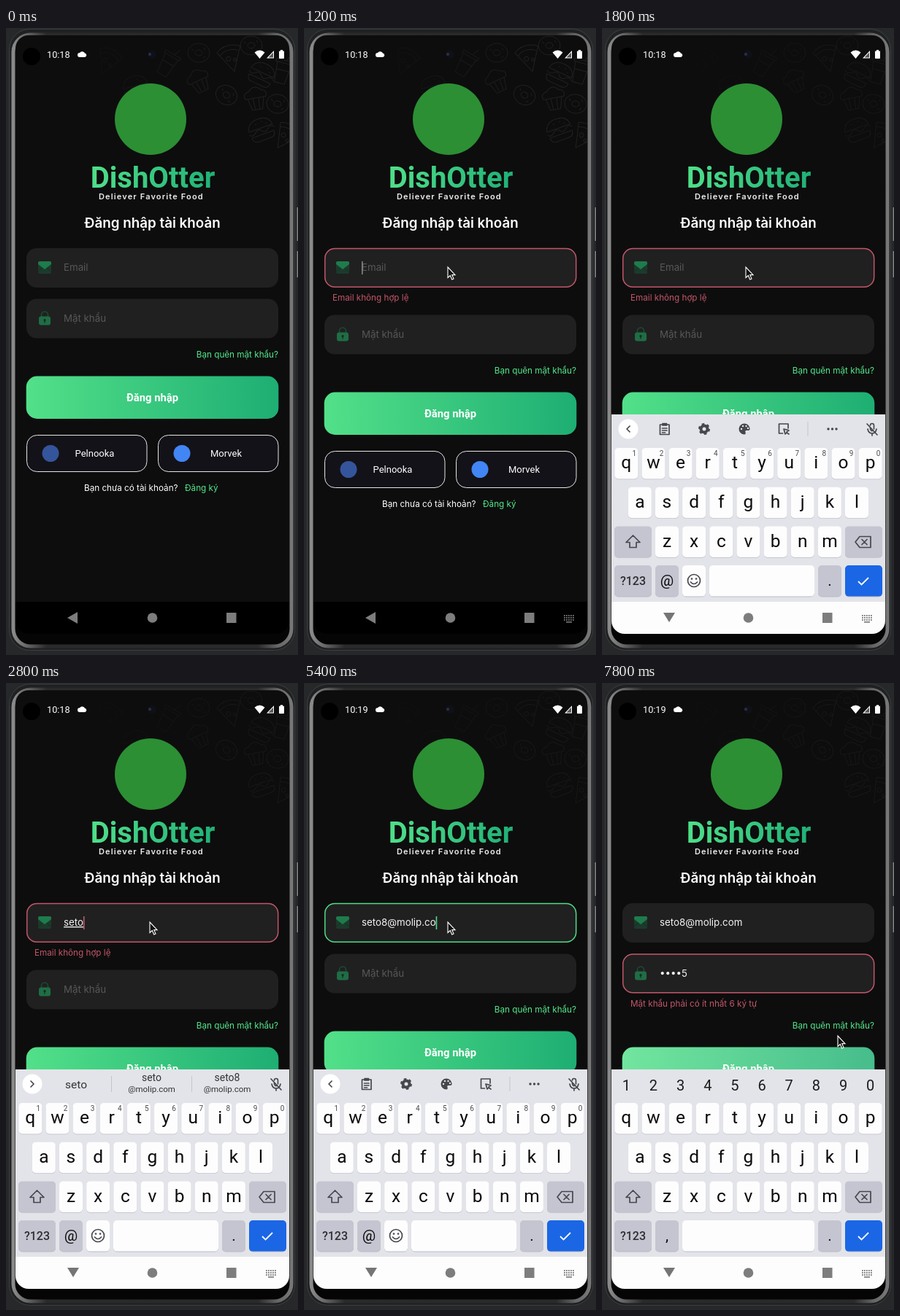
An HTML page that plays this animation: 400 px wide and 860 px high, repeating every 8000 ms.

```html
<!DOCTYPE html>
<html lang="vi">
<head>
<meta charset="utf-8">
<title>Login</title>
<style>
html, body { margin: 0; width: 100%; height: 100%; overflow: hidden; background: #26282a; }
svg { display: block; width: 400px; height: 860px; }
text { font-family: Inter, sans-serif; white-space: pre; }
.r { font-family: Roboto, sans-serif; }
.m { text-anchor: middle; }
.e { text-anchor: end; }
.s { font-size: 11.7px; }
.f { font-size: 13.3px; }
.i { fill: none; stroke: #45474d; stroke-width: 1.7; stroke-linejoin: round; stroke-linecap: round; }
</style>
</head>
<body>
<svg id="stage" viewBox="0 0 400 860" xmlns="http://www.w3.org/2000/svg"></svg>
<script>
const LOOP = 8000, STEP = 200, SHIFT = 22;
const EMAIL = 'seto8@molip.com', PASS = '12345';
const EMAIL_KEYS = [2000, 2200, 2400, 2600, 3400, 4000, 4200, 4400, 4600, 4600, 4800, 5000, 5200, 5400, 5600];
const PASS_KEYS = [6400, 6600, 6600, 6800, 7200];
const POINTER = [[200, 392, 560], [400, 340, 470], [600, 262, 380], [800, 197, 328], [5600, 197, 328],
  [5800, 208, 362], [6000, 226, 396], [6400, 230, 400], [6800, 237, 469], [7000, 240, 472],
  [7400, 288, 505], [7600, 312, 502], [7800, 323, 484]];
const RED = '#c2566a', GREEN = '#4fdc87';

const rect = (x, y, w, h, r, fill, more = '') =>
  `<rect x="${x}" y="${y}" width="${w}" height="${h}" rx="${r}" fill="${fill}" ${more}/>`;
const circle = (x, y, r, fill, more = '') => `<circle cx="${x}" cy="${y}" r="${r}" fill="${fill}" ${more}/>`;
const path = (d, more = '') => `<path d="${d}" ${more}/>`;
const text = (x, y, str, cls, fill, more = '') =>
  `<text x="${x}" y="${y}" class="${cls}" fill="${fill}" ${more}>${str}</text>`;
const group = (id, body, more = '') => `<g id="${id}" ${more}>${body}</g>`;

// Faint food outlines behind the header
const doodles = {
  pizza: 'M-16-12Q0-22 17-10L-2 20ZM-13-7Q0-15 13-5M-4-2a3 3 0 1 0 .1 0M4 3a2 2 0 1 0 .1 0',
  burger: 'M-17-3Q-15-16 0-16T17-3ZM-18 1q4 5 9 0t9 0t9 0t9 0M-16 6H16Q16 14 9 14H-9Q-16 14-16 6M-6-10h2M3-11h2M8-7h2',
  donut: 'M-15 0a15 13 0 1 0 30 0a15 13 0 1 0-30 0M-5 0a5 4 0 1 0 10 0a5 4 0 1 0-10 0M-10-5l3 2M7-7l2 3M9 5l-3 2',
  cup: 'M-10-10H10L7 18H-7ZM-12-14H12V-10H-12ZM2-14L6-24M-9 0H9',
  muffin: 'M-14 0Q-18-8-8-10Q0-20 9-10Q18-8 14 0ZM-11 0L-7 16H7L11 0M-4 1L-3 15M4 1L3 15'
};
const spots = [['pizza', 140, 45, 20], ['burger', 178, 82, -15], ['cup', 222, 48, 30], ['donut', 264, 34, 0],
  ['muffin', 264, 72, -25], ['pizza', 308, 40, -20], ['donut', 302, 92, 30], ['burger', 350, 64, 25],
  ['muffin', 342, 96, -10], ['donut', 372, 104, 10], ['cup', 379, 58, 15], ['burger', 350, 140, -20],
  ['pizza', 384, 148, 30], ['donut', 336, 24, 0]];
const pattern = spots.map(([k, x, y, a]) =>
  path(doodles[k], `transform="translate(${x} ${y}) rotate(${a})"`)).join('');

function field(id, label, icon) {
  return group(id, rect(28, 302, 345, 54, 14, '#202020') +
    rect(28.7, 302.6, 344, 52.6, 13.5, 'none', `id="${id}Box" stroke-width="1.5"`) + icon +
    text(79, 333, label, 'f', '#575757', `id="${id}Hint"`) +
    text(79, 333, '', 'f', '#f4f4f4', `id="${id}Text"`) +
    rect(0, 320, 1.6, 18, 0, RED, `id="${id}Caret"`) +
    text(39, 374, id === 'mail' ? 'Email không hợp lệ' : 'Mật khẩu phải có ít nhất 6 ký tự', 's', RED, `id="${id}Err"`));
}
const envelope = rect(44, 321, 18, 16, 2, '#1c3a2c') +
  path('M44 322q0-2 2-2h14q2 0 2 2v2l-9 7-9-7Z', 'fill="#1e7c4c"') +
  path('M44 334l6-5M62 334l-6-5', 'stroke="#193025"');
const lock = path('M48.5 327v-3a4.5 4.5 0 0 1 9 0v3', 'fill="none" stroke="#1b4a34" stroke-width="1.6"') +
  rect(45, 326, 16, 12, 3, '#1f6d45') + circle(53, 331, 1.6, '#12291e') + rect(52.4, 331, 1.2, 4, 0, '#12291e');

function social(x, name, color) {
  return rect(x + .5, 558.5, 164.5, 50, 14, '#131218', 'stroke="#e6e6e6"') +
    circle(x + 33, 583.5, 11.5, color) + text(x + 93.5, 588, name, 'r m', '#fff', 'font-size="13"');
}

const app = rect(13, 10, 375, 821, 0, '#0d0d0d') +
  group('pattern', pattern, 'fill="none" stroke="#fff" stroke-width="1" mask="url(#fade)"') +
  circle(35, 39, 12, '#000') + circle(200, 36, 5.5, '#101116') + circle(197, 36, 2, '#263052') +
  text(56, 41, '', 'r', '#fff', 'id="clock" font-size="12.7"') +
  path('M101 40a3 3 0 0 1 0-6a4 4 0 0 1 7 .5a2.8 2.8 0 0 1 0 5.5Z', 'fill="#fff"') +
  path('M340.5 33.5q7-6 14 0L347.5 42ZM357 41.5L367 31V41.5Z', 'fill="#fff"') +
  path('M359.5 40.5L366 33.5V40.5Z', 'fill="#555"') +
  rect(374, 31.5, 7, 10.5, 1, '#fff') + rect(376, 30, 3, 2, 0, '#fff') +
  circle(198, 125, 49, '#2c8f34') +
  text(201, 219, 'DishOtter', 'r m', 'url(#brand)', 'font-size="40" font-weight="700"') +
  text(127, 235, 'Deliever Favorite Food', '', '#eee', 'font-size="11" font-weight="600" letter-spacing="1.15"') +
  text(200.5, 274, 'Đăng nhập tài khoản', 'm', '#fff', 'font-size="18.8" font-weight="600"') +
  field('mail', 'Email', envelope) + field('pass', 'Mật khẩu', lock) +
  group('below',
    text(373, 452, 'Bạn quên mật khẩu?', 's e', '#53e88b') +
    rect(27.7, 477.6, 345.6, 58.4, 15, 'url(#btn)') +
    rect(27.7, 477.6, 345.6, 58.4, 15, '#fff', 'id="glow" opacity=".18"') +
    text(200.5, 512, 'Đăng nhập', 'r m', '#fff', 'font-size="14.8" font-weight="700"') +
    social(28, 'Pelnooka', '#34559b') + social(208, 'Morvek', '#4285f4') +
    text(107, 635, 'Bạn chưa có tài khoản?', 's', '#fff') + text(245, 635, 'Đăng ký', 's', '#53e88b')) +
  rect(13, 787, 375, 44, 0, '#000');

// Keyboard
const PITCH = 37.15, ROWS = [576, 629.7, 683.4, 737.1];
const GRAY = '#c4c5d0', WHITE = '#fdfdfe';
const cap = (x, row, w, fill) => rect(x, ROWS[row] + 1, w, 42.3, 5, '#bcbec6') + rect(x, ROWS[row], w, 42.5, 5, fill);
const letter = (x, row, ch, fill = WHITE, size = 24.5) =>
  cap(x - 16, row, 32, fill) + text(x, ROWS[row] + 28.2, ch, 'r m', '#0b0b0c', `font-size="${size}"`);
const letters = (str, x, row) => [...str].map((c, n) => letter(x + n * PITCH, row, c)).join('');
const digits = (dx, y, size, fill) => [...'1234567890'].map((c, n) =>
  text(33.3 + dx + n * PITCH, y, c, 'r m', fill, `font-size="${size}"`)).join('');

const smiley = circle(126, 758, 8.5, 'none', 'class="i"') + circle(123, 755.5, 1.3, '#45474d') +
  circle(129, 755.5, 1.3, '#45474d') + path('M121.5 760q4.5 5 9 0', 'class="i"');
const gear = circle(140, 550, 4.5, 'none', 'stroke="#45474d" stroke-width="4"') +
  circle(140, 550, 6.8, 'none', 'stroke="#45474d" stroke-width="2.4" stroke-dasharray="3.6 3.52"');
const palette = path('M195 542.5a7.5 7.5 0 1 0 0 15q2.5-.5 1.5-3t1.5-2.5h2.5q2.5-.5 2-3q-1.5-6.5-7.5-6.5Z', 'fill="#45474d"') +
  [[191, 550], [193, 546], [197.5, 546], [200, 549]].map(([x, y]) => circle(x, y, 1.2, '#e3e4e9')).join('');
const toolbar = rect(58, 530, 55, 40, 0, '#d0d1d7', 'id="press"') + circle(36, 550, 13.5, '#fff') +
  path('M38 546l-4 4 4 4', 'class="i"') +
  path('M79.5 544h12.5v13.5h-12.5ZM83 544v-1.5h5.5v2.5h-5.5M82.5 549h6.5M82.5 552h6.5M82.5 555h4', 'class="i"') +
  gear + palette +
  path('M255 549v-6h-12.5v13h5M249 550l2 7 2-2 3 2M249 550l7 2-3 2', 'class="i"') +
  path('M282 540v20', 'stroke="#c3c5cc"') +
  [310, 315.5, 321].map(x => circle(x, 550, 1.7, '#45474d')).join('');
const hints = circle(36, 550, 13.5, '#fff') + path('M34 546l4 4-4 4', 'class="i"') +
  path('M144.5 539v22M254.5 539v22', 'stroke="#c3c5cc"') +
  ['A', 'B', 'C'].map((k, n) =>
    text([96, 199.5, 303][n], n ? 546 : 556, '', 'r m', '#333', `id="word${k}" font-size="${n ? 14 : 15.5}"`)).join('') +
  [199.5, 303].map(x => text(x, 561, '@molip.com', 'r m', '#333', 'font-size="11.5"')).join('');
const mic = path('M367.5 545a2.5 2.5 0 0 1 5 0v5M367.5 548v2q1 3 3 2.5M364 550q1 6 6 6t6-6M370 556v3M363 543l14 15', 'class="i"');

const keyboard = rect(13, 530, 375, 258, 0, '#e3e4e9') + rect(13, 787, 375, 60, 0, WHITE) +
  group('toolbar', toolbar) + group('hints', hints) + group('mic', mic) +
  letters('qwertyuiop', 33.3, 0) + letters('asdfghjkl', 51.8, 1) + letters('zxcvbnm', 89, 2) +
  group('supers', digits(11, 586.5, 10, '#4a4b50')) + group('numbers', digits(0, 558.5, 20, '#1b1b1d')) +
  cap(17, 2, 51, GRAY) + path('M42.5 696l9.5 9.5h-5v7h-9v-7h-5Z', 'class="i"') +
  cap(333, 2, 51, GRAY) + path('M353 697.5h15v15h-15l-6-7.5ZM356 701.5l7 7M363 701.5l-7 7', 'class="i"') +
  cap(17, 3, 51, GRAY) + text(42.5, 764, '?123', 'r m', '#2e2f33', 'font-size="16" font-weight="500"') +
  group('mailRow', letter(89, 3, '@', GRAY, 20.5) + cap(110, 3, 32, WHITE) + smiley + cap(147, 3, 144, WHITE)) +
  group('passRow', letter(89, 3, ',', GRAY, 21) + cap(110, 3, 181, WHITE)) +
  letter(312, 3, '.', GRAY, 21) + cap(333, 3, 51, '#1a66e5') +
  path('M351 759l4.5 4.5 9.5-9.5', 'fill="none" stroke="#fff" stroke-width="1.8"');

const dots = [0, 1, 2].map(r => [0, 1, 2, 3, 4].map(c => rect(356 + c * 3, 805 + r * 3, 1.8, 1.8, 0, '#777')).join('')).join('');
const nav = group('back', path('M84 809L98 801V817Z', 'fill="#7d7d7d"')) +
  group('down', path('M84 802H100L92 815Z', 'fill="#757575"')) +
  circle(200.5, 809, 6.8, '#7d7d7d') + rect(302, 802, 13.5, 14, 0, '#7d7d7d') +
  group('kbIcon', dots + rect(359, 814, 8, 1.6, 0, '#777'));

const defs = `<defs>
<linearGradient id="btn"><stop stop-color="#52e089"/><stop offset="1" stop-color="#1eae73"/></linearGradient>
<linearGradient id="brand"><stop stop-color="#4fe08a"/><stop offset="1" stop-color="#20b076"/></linearGradient>
<linearGradient id="metal"><stop stop-color="#8a8a8a"/><stop offset=".05" stop-color="#666"/><stop offset=".12" stop-color="#2a2a2a"/>
<stop offset=".88" stop-color="#2a2a2a"/><stop offset=".95" stop-color="#666"/><stop offset="1" stop-color="#777"/></linearGradient>
<linearGradient id="fadeFill"><stop offset=".2" stop-color="#222"/><stop offset=".8" stop-color="#fff"/></linearGradient>
<mask id="fade" maskUnits="userSpaceOnUse" x="0" y="0" width="400" height="190">${rect(13, 0, 375, 190, 0, 'url(#fadeFill)')}</mask>
<clipPath id="screen">${rect(13, 10, 375, 821, 18, '#fff')}</clipPath></defs>`;

const frame = rect(0, 0, 400, 860, 0, '#26282a') +
  rect(398.6, 246, 1.4, 46, 0, '#8a8a8a') + rect(398.6, 306, 1.4, 36, 0, '#8a8a8a') +
  rect(4.5, 1.5, 391, 852, 28, '#1f2122', 'stroke="#3d4042"') +
  rect(10, 9, 381, 839, 24, '#050505', 'stroke="url(#metal)" stroke-width="5"');

const stage = document.getElementById('stage');
stage.innerHTML = defs + frame +
  group('view', app + group('kb', keyboard) + nav, 'clip-path="url(#screen)"') +
  group('pointer', path('M0 0V14.5L3.3 11.5L5.7 17L8 16L5.7 10.6H10Z', 'fill="#111" stroke="#fff" stroke-width="1.1"'));

const el = {};
stage.querySelectorAll('[id]').forEach(n => el[n.id] = n);
const show = (id, on) => el[id].style.display = on ? '' : 'none';
const move = (id, x, y) => el[id].setAttribute('transform', `translate(${x} ${y})`);
const put = (id, str) => { if (el[id].textContent !== str) el[id].textContent = str; };
const typed = (keys, t) => keys.filter(k => k <= t).length;

function pointerAt(t) {
  const n = POINTER.findIndex(p => p[0] >= t);
  const b = POINTER[n], a = POINTER[Math.max(0, n - 1)];
  const k = b === a ? 0 : (t - a[0]) / (b[0] - a[0]);
  return [a[1] + (b[1] - a[1]) * k, a[2] + (b[2] - a[2]) * k];
}

function drawField(id, str, focus, error, since, t) {
  const color = error ? RED : GREEN;
  put(id + 'Text', str);
  show(id + 'Hint', !str);
  show(id + 'Err', error);
  el[id + 'Box'].setAttribute('stroke', focus ? color : 'none');
  show(id + 'Caret', focus && Math.floor((t - since) / 500) % 2 === 0);
  el[id + 'Caret'].setAttribute('fill', str ? color : '#8c8286');
  el[id + 'Caret'].setAttribute('x', 79 + (str ? el[id + 'Text'].getComputedTextLength() : 0));
}

function draw(ms) {
  const t = Math.floor(ms / STEP) * STEP;
  const nMail = typed(EMAIL_KEYS, t), nPass = typed(PASS_KEYS, t);
  const mail = EMAIL.slice(0, nMail);
  const secret = nPass ? '•'.repeat(nPass - 1) + PASS[nPass - 1] : '';
  const onPass = t >= 6200, onMail = t >= 1000 && !onPass;
  const mailErr = onMail && t < 5400;

  drawField('mail', mail, onMail, mailErr, EMAIL_KEYS[nMail - 1] || 1000, t);
  drawField('pass', secret, onPass, onPass, PASS_KEYS[nPass - 1] || 6200, t);
  const composing = nMail > 0 && nMail < 6;
  el.mailText.setAttribute('text-decoration', composing ? 'underline' : 'none');
  move('pass', 0, 69.5 + (mailErr ? SHIFT : 0));
  move('below', 0, mailErr || onPass ? SHIFT : 0);
  show('glow', t >= 7600);

  put('clock', t < 3000 ? '10:18' : '10:19');
  el.pattern.setAttribute('opacity', t < 1400 ? .08 : .045);

  const open = t >= 1400;
  show('kb', open);
  move('kb', 0, t === 1400 ? 11 : 0);
  show('press', t === 1400);
  show('toolbar', !onPass && !composing);
  show('hints', !onPass && composing);
  show('mic', !onPass);
  show('supers', !onPass);
  show('numbers', onPass);
  show('mailRow', !onPass);
  show('passRow', onPass);
  put('wordA', mail);
  put('wordB', mail);
  put('wordC', EMAIL.slice(0, 5));
  show('back', !open);
  show('down', open);
  show('kbIcon', t >= 1200);

  show('pointer', t >= 200);
  move('pointer', ...pointerAt(t));
}

function tick(now) {
  draw(now % LOOP);
  requestAnimationFrame(tick);
}
draw(0);
requestAnimationFrame(tick);
</script>
</body>
</html>
```
